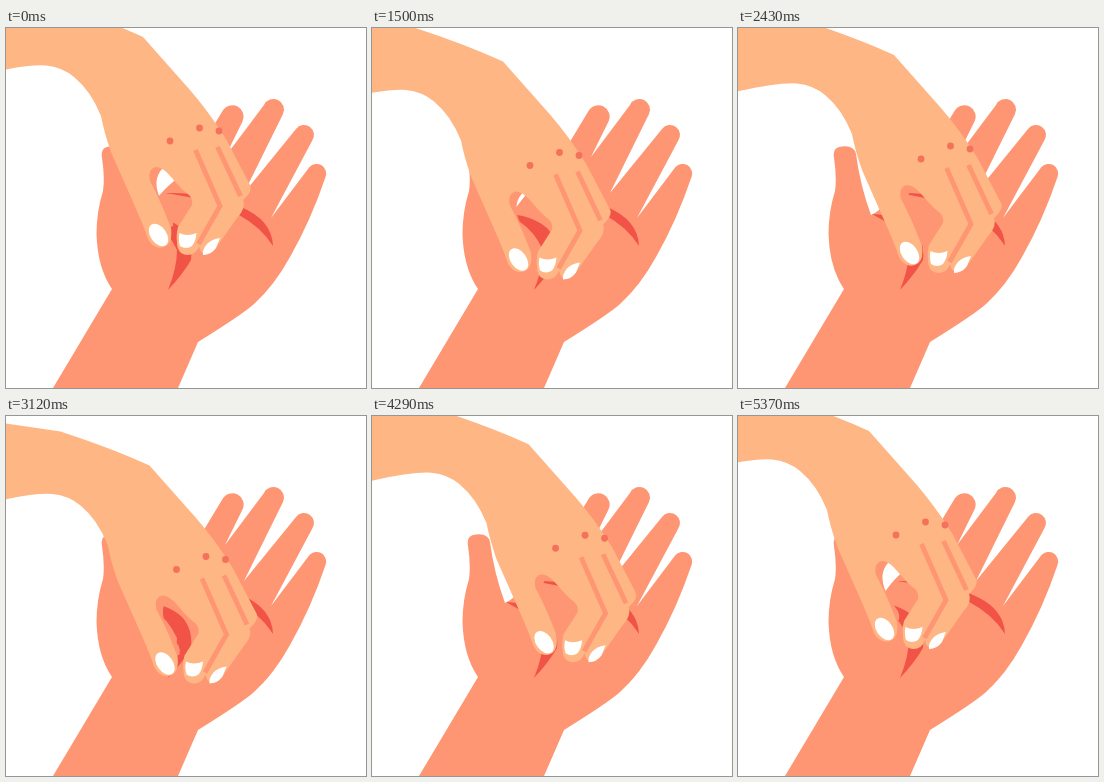
Write an HTML page that moves like this. It is 360 px wide and 360 px high and loops after 5400 ms.

```html
<!DOCTYPE html>
<html lang="en">
<head>
<meta charset="utf-8">
<title>Hand massage</title>
<style>
  html, body { margin: 0; width: 100%; height: 100%; overflow: hidden; background: #fff; }
  svg { display: block; width: 100vw; height: 100vh; }
  .palm { fill: #fe9573; }
  .crease { fill: #f25347; }
  .skin { fill: #feb685; }
  .fold { fill: none; stroke: #fe9573; stroke-width: 4.8; }
  .spot { fill: #f4715c; }
  .nail { fill: #fff; }
</style>
</head>
<body>
<svg viewBox="0 0 360 360">
  <path class="palm" d="M47 360 L106 261 Q91.500 240 90.500 206 Q90.500 184 97 163 Q99 150 96 130 Q94 119 104 118.500
    Q116 117 118 126 Q122 157 133 187 Q142 183 149 173 Q156 163 168 153 Q180 136 193 122
    L216.500 83 A11.300 11.300 0 0 1 236.500 93.500 L219 129 L258 77 A10.500 10.500 0 0 1 277 86
    L238 165 L290 101 A10 10 0 0 1 306 113 L265 190 L303.500 139 A9.600 9.600 0 0 1 319.500 149
    Q305 192 284 229 Q268 258 248 276 Q237 286 192 314 L172 360 Z"/>
  <path class="crease" d="M134 186 Q161 187 176 201 Q187 213 185 232 Q177 246 162 262
    Q171 240 171 222 Q162 203 148 194 Z"/>
  <path class="crease" d="M159 165 Q205 164 235 179 Q266 192 267 218 Q255 199 233 187 Q205 171 159 165 Z"/>

  <g id="hand">
    <path class="palm" d="M158 139 Q142 134 141 147 Q148 172 163 200 L167 198
      Q168 193 166 189 Q155 175 152 165 Q147 149 158 139 Z"/>
    <path class="skin" d="M-40 -38 L48 -25 Q100 -8 137 9 L184 62 Q203 84 220 111 L244 157
      Q247 163 237 172 Q240 180 231 190 L212 217 Q205 228 198 226 Q194 224 193 218
      Q190 227 181 227 Q171 226 171 214 Q170 206 172 199 L186 177 Q187 171 183 167
      Q175 161 166 150 Q157 139 150 139 Q141 141 144 153 Q150 164 157 180 Q161 190 165 200
      Q167 216 158 219 Q148 222 142 211 Q138 199 131 183 L105 124 Q98 104 95 88
      Q85 63 68 49 Q56 39 40 37.500 Q22 36 -22 46 L-40 50 Z"/>
    <path class="fold" d="M189.500 122 L214 178 L192.500 216"/>
    <path class="fold" d="M211.500 119 L234.500 168"/>
    <circle class="spot" cx="164" cy="113" r="3.400"/>
    <circle class="spot" cx="193.500" cy="100" r="3.400"/>
    <circle class="spot" cx="213" cy="103" r="3.400"/>
    <ellipse class="nail" rx="8" ry="12.500" transform="translate(152.500 207) rotate(-35)"/>
    <path class="nail" d="M173.500 205 Q181 209 190.500 205 Q190 213 186 218 Q180 222 174 218 Q172 211 173.500 205 Z"/>
    <path class="nail" d="M214 210 Q206 211 201 216 Q196 222 197 227 Q205 227 210 220 Z"/>
  </g>
</svg>
<script>
  const STEP = 30, STEPS = 180, CYCLE = 61;
  // Knots of one rubbing circle: step, x, y
  const knots = [
    [0, 0, 0], [4, 4, 2], [11, 12, 8], [20, 19, 18], [28, 22, 29], [34, 20, 39.500],
    [38, 15, 43.700], [43, 6.500, 40.500], [50, -6, 24.500], [53, -8.500, 16], [57, -6, 6]
  ];
  const n = knots.length;
  const hand = document.getElementById('hand');

  function knot(i) {
    const [s, x, y] = knots[(i + n) % n];
    return [s + CYCLE * Math.floor(i / n), x, y];
  }

  function slope(i, axis) {
    const a = knot(i - 1), b = knot(i + 1);
    return (b[axis] - a[axis]) / (b[0] - a[0]);
  }

  function position(step, axis) {
    let i = n - 1;
    while (knots[i][0] > step) i--;
    const a = knot(i), b = knot(i + 1);
    const d = b[0] - a[0], u = (step - a[0]) / d, v = 1 - u;
    return v * v * ((1 + 2 * u) * a[axis] + u * d * slope(i, axis))
         + u * u * ((1 + 2 * v) * b[axis] - v * d * slope(i + 1, axis));
  }

  const start = performance.now();
  function draw(now) {
    // The loop restarts just before the third circle closes
    const step = Math.floor(Math.max(0, now - start) / STEP) % STEPS % CYCLE;
    hand.setAttribute('transform', `translate(${position(step, 1)} ${position(step, 2)})`);
    requestAnimationFrame(draw);
  }
  draw(start);
</script>
</body>
</html>
```
